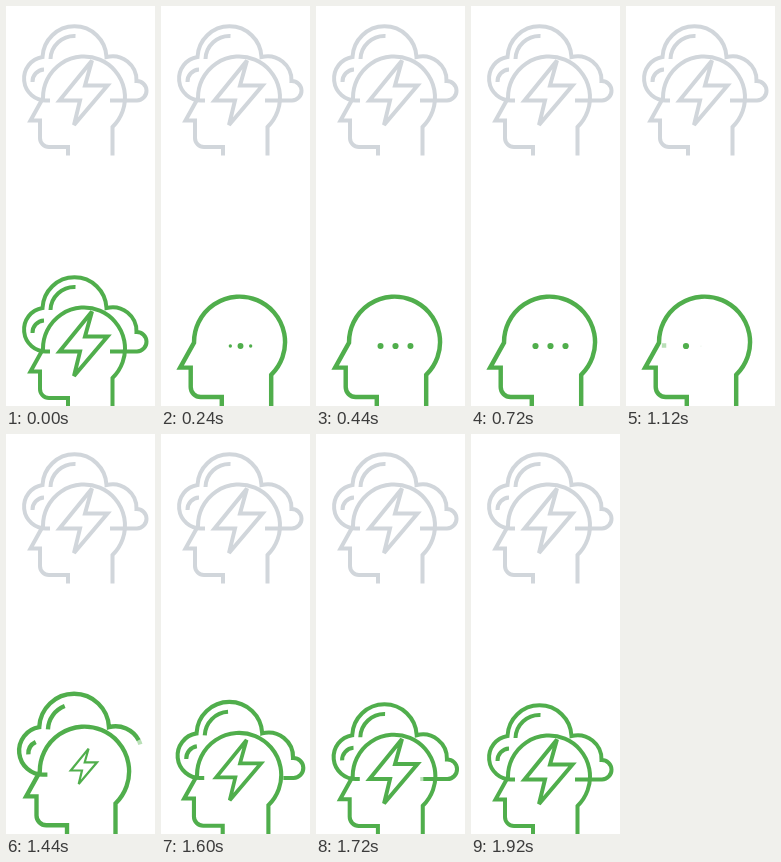
An HTML page that plays this animation: 149 by 400 pixels, repeating every 2600 ms.

```html
<!DOCTYPE html>
<html lang="en">
<head>
<meta charset="utf-8">
<title>Brainstorm icon</title>
<style>
html, body { margin: 0; width: 100%; height: 100%; overflow: hidden; background: #fff; }
svg { display: block; width: 149px; height: 400px; }
.icon { fill: none; stroke-width: 4; }
</style>
</head>
<body>
<svg viewBox="0 0 149 400">
  <defs>
    <path id="head" d="M62 149.5V141H43A9 9 0 0 1 34 132V114.5H24.5L37 92A41 41 0 1 1 106.5 121V149.5"/>
    <path id="bolt" d="M86 54.5L53.5 94.5H74L68 119L101.5 79.5H79Z"/>
    <path id="cloud" pathLength="1" d="M44 94.5H41A21.9 21.9 0 0 1 36.5 51A32.03 32.03 0 0 1 100.5 51A24 24 0 0 1 130.5 75A9.75 9.75 0 0 1 131 94.5H104"/>
    <path id="shine1" pathLength="1" d="M44.5 53A24 24 0 0 1 69.5 30"/>
    <path id="shine2" pathLength="1" d="M26.5 76A12 12 0 0 1 38 63.5"/>
  </defs>
  <g class="icon" stroke="#d1d6db">
    <use href="#head"/><use href="#bolt"/><use href="#cloud"/><use href="#shine1"/><use href="#shine2"/>
  </g>
  <g class="icon" stroke="#50ae4c" id="live">
    <use href="#head"/>
    <g id="spark"><use href="#bolt"/></g>
    <g id="tip" opacity=".4"><use href="#cloud"/></g>
    <g id="lines"><use href="#cloud"/><use href="#shine1"/><use href="#shine2"/></g>
  </g>
  <g id="dots" fill="#50ae4c"><circle cy="340"/><circle cy="340"/><circle cy="340"/></g>
</svg>
<script>
const $ = id => document.getElementById(id);
const dots = [...$('dots').children];
const LOOP = 2600, GROWN = 0.11;

const span = (t, a, b) => Math.min(1, Math.max(0, (t - a) / (b - a)));
const easeOut = p => 1 - (1 - p) ** 5;

// cubic-bezier(.4, 0, .2, 1)
function ease(x) {
  let lo = 0, hi = 1, u = 0.5;
  for (let i = 0; i < 24; i++) {
    u = (lo + hi) / 2;
    const bx = 1.2 * (1 - u) ** 2 * u + 0.6 * (1 - u) * u * u + u ** 3;
    if (bx < x) lo = u; else hi = u;
  }
  return x <= 0 ? 0 : x >= 1 ? 1 : u * u * (3 - 2 * u);
}
const move = (t, a, b) => ease(span(t, a, b));

function zoom(el, s, x, y) {
  el.setAttribute('transform', `translate(${x} ${y}) scale(${s}) translate(${-x} ${-y})`);
}

// Show only the part of each line between fractions a and b
function trim(el, a, b) {
  el.style.display = b - a > 0.002 ? '' : 'none';
  el.style.strokeDasharray = a <= 0 && b >= 1 ? 'none' : `0 ${a} ${b - a} 2`;
}

function draw(t) {
  const s = 1 + GROWN * (move(t, 60, 240) - move(t, 1300, 1920));
  $('live').setAttribute('transform', `translate(73 400.5) scale(${s}) translate(-73 -149.5)`);

  const bolt = t < 700 ? 1 - move(t, 40, 200) : move(t, 1255, 1785);
  $('spark').style.display = bolt > 0.01 ? '' : 'none';
  zoom($('spark'), bolt, 77.5, 87);

  if (t < 700) {
    const gone = move(t, 30, 190);
    trim($('lines'), gone, 1);
    trim($('tip'), 1, 1);
  } else {
    const drawn = move(t, 1100, 1820);
    trim($('lines'), 0, drawn);
    trim($('tip'), drawn, drawn > 0 && drawn < 1 ? Math.min(1, drawn + 0.015) : drawn);
  }

  dots.forEach((dot, i) => {
    const side = i - 1, start = side ? 160 : 110;
    const spread = easeOut(span(t, 160, 560));
    const grow = easeOut(span(t, start, side ? 720 : 400));
    const leave = 1160 - 40 * i;
    const shrink = 1 - move(t, leave - 40, leave + 40 - 20 * i);
    dot.setAttribute('cx', 79.5 + 15 * side * spread - 4.5 * move(t, 980, 1120));
    dot.setAttribute('r', 3.1 * grow * shrink);
  });
}

const begin = performance.now();
function tick() {
  draw((performance.now() - begin) % LOOP);
  requestAnimationFrame(tick);
}
tick();
</script>
</body>
</html>
```
